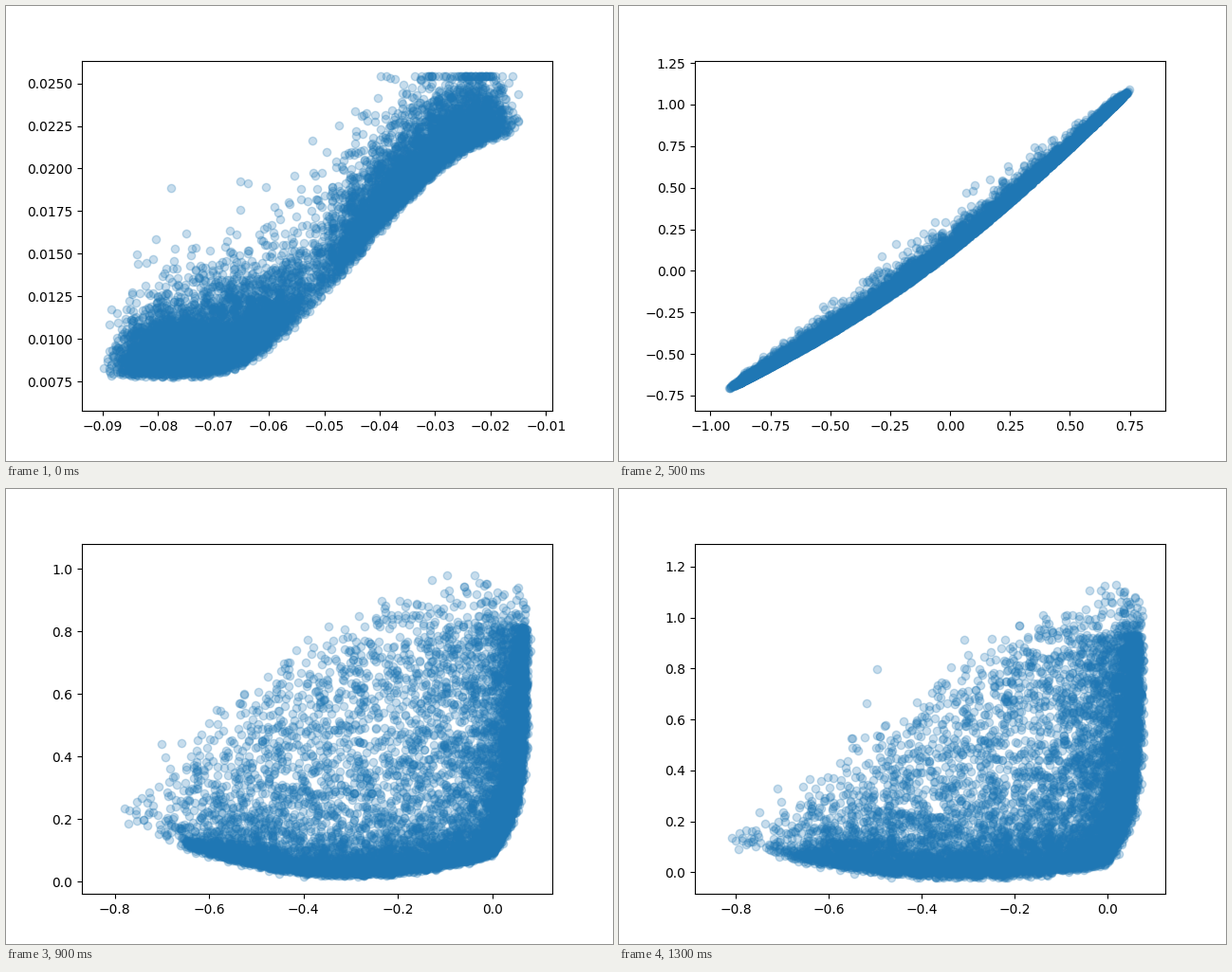
These frames come from a looping animation (640x480 px, 1.4 s). A matplotlib script:

```python
import numpy as np
import matplotlib.pyplot as plt
from matplotlib.animation import FuncAnimation

FRAMES = 14
INTERVAL = 100
LOWER, UPPER, INNER = 3200, 2800, 2600
TOTAL = LOWER + UPPER + INNER

rng = np.random.default_rng(7)
index = np.arange(TOTAL)
is_lower = index < LOWER
is_inner = index >= LOWER + UPPER
is_upper = ~is_lower & ~is_inner

# Edge samples run along one arm, inner ones have a radius and an angle.
along = 1.12 * rng.beta(1, 1.25, TOTAL)
angle = np.pi / 2 * rng.beta(0.7, 0.7, TOTAL)
radius = np.abs(1.25 * rng.random(TOTAL) ** 0.55 + rng.normal(0, 0.07, TOTAL))
spread = rng.exponential(1, TOTAL)
bulge = rng.gamma(2, 1, TOTAL)
jitter = rng.normal(size=(TOTAL, 2))


def features(power=2, thickness=0):
    """Amounts of the lower and the upper feature in every sample."""
    thin = thickness * spread ** 1.5
    a = np.select([is_lower, is_upper], [along, thin],
                  radius * np.cos(angle) ** (2 / power))
    b = np.select([is_lower, is_upper], [thin, along],
                  radius * np.sin(angle) ** (2 / power))
    return a, b


# Every shape fills the unit square.
def band():
    a, b = features()
    s = b - a
    x = 0.49 + 0.4 * np.sign(s) * np.abs(s) ** 0.6 + 0.025 * jitter[:, 0]
    rise = np.clip((x - 0.22) / 0.76, 0, 1)
    y = 0.055 + 0.38 * (1 - np.cos(np.pi * rise))
    y += bulge * (0.033 + 0.03 * np.sin(np.pi * x))
    return x, y


def bow(dip, fuzz):
    a, b = features()
    x = 0.5 + 0.5 * np.tanh(1.3 * (b - a))
    return x, x + np.sin(np.pi * x) * (fuzz * spread - dip)


def fan(power, thickness, low_x, bend):
    a, b = features(power, thickness)
    a, b = 0.64 * a, 0.64 * b
    x = 0.985 - 0.08 * np.exp(-b / 0.13) - a
    floor = 0.015 + bend * (np.minimum(x + 0.3 * b, 0.91) - low_x) ** 2
    noise = 0.15 * thickness * jitter.T
    return x + noise[0], floor + b + noise[1]


# Frame, data range (x from, x to, y from, y to) and shape.
KEYS = [
    (0, (-0.0899, -0.0127, 0.0067, 0.0254), band()),
    (3, (-1.115, 1.4265, -0.884, 1.688), bow(0.08, 0.014)),
    (5, (-0.976, 0.809, -0.7466, 1.168), bow(0.1, 0.02)),
    (7, (-1.343, 0.0754, 0.0738, 1.383), fan(3, 0.015, 0.88, 0.28)),
    (9, (-0.824, 0.0812, 0.0124, 1.0306), fan(2.2, 0.04, 0.58, 0.6)),
    (11, (-0.822, 0.081, 0.0036, 1.1034), fan(1.9, 0.05, 0.58, 0.6)),
    (13, (-0.842, 0.0785, -0.022, 1.228), fan(1.5, 0.06, 0.58, 0.35)),
]


def scaled(bounds, shape):
    bounds = np.array(bounds)
    low, high = bounds[::2], bounds[1::2]
    unit = np.clip(np.column_stack(shape), 0, 1)
    return bounds, low + unit * (high - low)


def state(frame):
    """Data range and points, mixed from the two nearest keys."""
    i = max(k for k in range(len(KEYS) - 1) if KEYS[k][0] <= frame)
    (start, *before), (end, *after) = KEYS[i:i + 2]
    w = (frame - start) / (end - start)
    return [(1 - w) * p + w * q
            for p, q in zip(scaled(*before), scaled(*after))]


fig, ax = plt.subplots(figsize=(6.4, 4.8), dpi=100)
dots = ax.scatter([], [], s=36, color="C0", alpha=0.25)


def padded(low, high):
    margin = 0.05 * (high - low)
    return low - margin, high + margin


def update(frame):
    bounds, points = state(frame)
    dots.set_offsets(points)
    ax.set_xlim(padded(*bounds[:2]))
    ax.set_ylim(padded(*bounds[2:]))
    return (dots,)


anim = FuncAnimation(fig, update, frames=FRAMES, interval=INTERVAL,
                     init_func=lambda: (dots,), repeat=True, repeat_delay=0)
plt.show()
```
